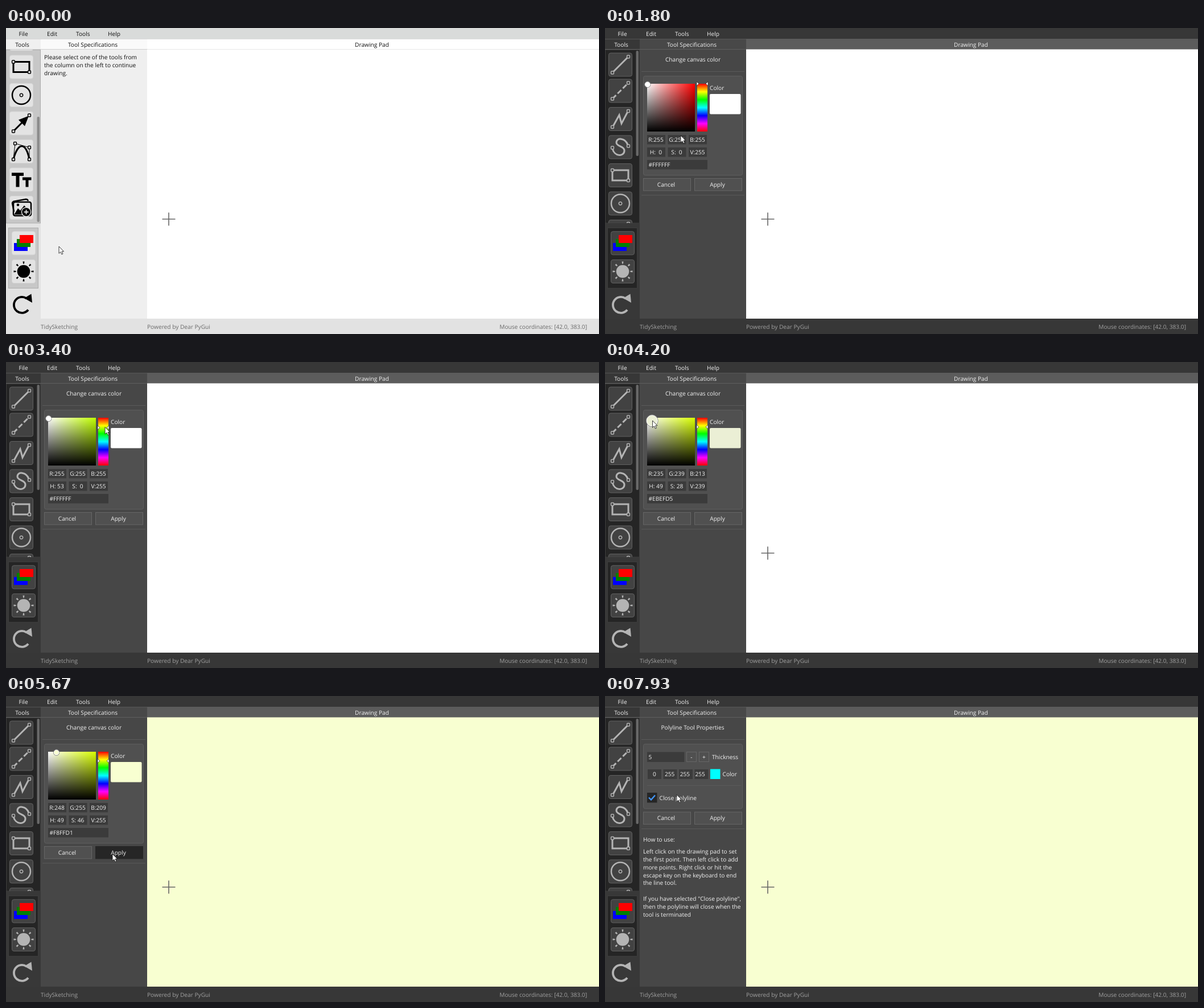
An HTML page for the animation above (8 s loop, 1042 by 538 pixels).

```html
<!DOCTYPE html>
<html lang="en">
<head>
<meta charset="utf-8">
<title>Drawing app</title>
<style>
html, body { margin: 0; width: 100%; height: 100%; overflow: hidden; background: #fff; }
svg {
  display: block; width: 100vw; height: 100vh;
  --menu: #d9dbda; --headA: #f0f0f0; --headB: #fafafa; --headC: #fff; --rule: #cfcfcf;
  --panel: #efefef; --side: #e2e2e2; --tools: #c7c7c7; --edge: #adadad; --foot: #e2e2e2;
  --btn: #e3e3e3; --btnEdge: #d6d6d6; --hover: #f2f2f2; --thumb: #8c8c8c;
  --ink: #000; --text: #111; --dim: #6b6b6b; --tip: #f2f2f2;
}
svg.dark {
  --menu: #373737; --headA: #373737; --headB: #484848; --headC: #5c5c5c; --rule: #5f5f5f;
  --panel: #474747; --side: #383838; --tools: #252525; --edge: #3d3d3d; --foot: #373737;
  --btn: #424242; --btnEdge: #606060; --hover: #252525; --thumb: #686868;
  --ink: #b4b4b4; --text: #f2f2f2; --dim: #a0a0a0; --tip: #252525;
}
text { font: 10.17px "Open Sans", "Noto Sans", sans-serif; fill: var(--text); white-space: pre; text-rendering: geometricPrecision; }
.dim { fill: var(--dim); }
.menu { fill: var(--menu); } .headA { fill: var(--headA); } .headB { fill: var(--headB); }
.headC { fill: var(--headC); } .panel { fill: var(--panel); } .side { fill: var(--side); }
.foot { fill: var(--foot); } .thumb { fill: var(--thumb); } .rule { fill: var(--rule); }
.box { fill: var(--tools); stroke: var(--edge); }
.btn { fill: var(--btn); stroke: var(--btnEdge); }
.btn.hot { fill: var(--hover); }
.group { fill: #505050; stroke: #5e5e5e; }
.push { fill: #505050; stroke: #666; }
.push.hot { fill: #262626; stroke: #262626; }
.field { fill: #3b3b3b; }
.line { fill: #5a5a5a; }
.tip { fill: var(--tip); }
.ink { fill: none; stroke: var(--ink); stroke-width: 3; }
.solid { fill: var(--ink); }
.node { fill: var(--btn); stroke: var(--ink); stroke-width: 1.5; }
.thin { fill: none; stroke: var(--ink); stroke-width: 1; }
</style>
</head>
<body>
<svg id="app" viewBox="0 0 1042 538" preserveAspectRatio="none"></svg>
<script>
const LOOP = 8000, STEP = 200 / 3;

// Markup helpers
const rect = (x, y, w, h, cls, more = "") =>
  `<rect x="${x}" y="${y}" width="${w}" height="${h}" class="${cls}" ${more}/>`;
const text = (x, y, s, anchor = "start", more = "") =>
  `<text x="${x}" y="${y + 3.7}" text-anchor="${anchor}" ${more}>${s}</text>`;
const mid = (x, y, s, more) => text(x, y, s, "middle", more);
const path = (d, cls, more = "") => `<path d="${d}" class="${cls}" ${more}/>`;
const node = (x, y) => rect(x - 2.4, y - 2.4, 4.8, 4.8, "node", 'rx="1"');
const ends = node(-14, 14) + node(14, -14);
const button = (x, y, id) => rect(x - 20.5, y - 20.5, 41, 41, "btn", `rx="3.5" id="${id}"`);
const push = (x, y, label, id) =>
  rect(x + .5, y + .5, 83, 21.5, "push", `id="${id}"`) + mid(x + 40.5, y + 11.2, label);
const paragraph = (x, y, lines) => lines.map((s, i) => text(x, y + i * 13.8, s)).join("");

// Tool icons, drawn around their own centre
const icons = {
  line: path("M-14 14L14-14", "ink") + ends,
  dashed: path("M-14 14L14-14", "ink", 'stroke-dasharray="9 4"') + ends,
  polyline: path("M-13 13L-2-7L2 8L13-13", "ink", 'stroke-width="3.4"') + ends,
  doodle: path("M13-4C9-16-7-18-7-8C-7-1 8-2 7 7C6 17-11 17-14 2", "ink") + node(-14, 1) + node(14, -2),
  rect: path("M-14-9H14V9H-14Z", "ink") + node(-14, -9) + node(14, 9),
  circle: '<circle r="16" class="ink" style="stroke-width:2.5"/><circle r="2.7" class="thin" style="stroke-width:1.5"/>',
  arrow: path("M-14 14L8-8", "ink") + path("M13-13L-5-6L6 5Z", "solid") + ends,
  bezier: path("M-14 14L-11-14L14-7V14", "thin") + path("M-14 14C-6-17 8-17 14 14", "ink") +
    node(-11, -14) + node(14, -7) + node(-14, 14) + node(14, 14),
  letters: path("M-17-12H4V-6.5H-3.5V13H-9.5V-6.5H-17Z", "solid") + path("M2-4H17.5V1H12.5V13H7.5V1H2Z", "solid"),
  picture: path("M-13 7L-16-8Q-16-10-14-11L8-15Q11-15 12-12", "ink", 'style="stroke-width:2.5"') +
    rect(-14, -10, 31, 24, "ink", 'rx="3" style="stroke-width:2.5"') +
    path("M-12 11L-6 1L-2 5L5-4L14 6V12H-12Z", "solid") + '<circle cx="-6" cy="-5" r="2.3" class="solid"/>' +
    '<circle cx="8.5" cy="7.5" r="8.7" style="fill:var(--btn)"/><circle cx="8.5" cy="7.5" r="7.3" class="solid"/>' +
    path("M8.5 3.5V11.5M4.5 7.5H12.5", "", 'style="stroke:var(--btn);stroke-width:1.8"')
};
const tools = Object.entries(icons).map(([name, art], i) => {
  const y = i ? 110.5 + (i - 1) * 49.5 : 64.5;
  return button(27, y, name) + `<g transform="translate(27 ${y})">${art}</g>`;
}).join("");

const rays = [...Array(8)].map((_, i) =>
  path("M-1.5-17.5H1.5L.9-13.5H-.9Z", "solid", `transform="rotate(${i * 45})"`)).join("");

const channels = ["R", "G", "B", "H", "S", "V"].map((c, i) => {
  const x = 74 + (i % 3) * 36.5, y = i < 3 ? 188 : 210;
  return rect(x, y, 32, 16.5, "field") + mid(x + 15.5, y + 8.3, "", `id="ch${c}"`);
}).join("");

const hueStops = [..."0123456"].map(i => `<stop offset="${i / 6}" stop-color="hsl(${i * 60},100%,50%)"/>`).join("");
const pointer = "M0-3.6L4 0L0 3.6Z";

const colorPanel = `<g id="colorPanel">
  ${mid(154.5, 55, "Change canvas color")}${rect(64, 76, 181, 1, "line")}
  ${rect(67.5, 84.5, 174, 174.5, "group", 'rx="3"')}
  ${rect(74, 98, 84, 84, "", 'id="hueFill"')}
  ${rect(74, 98, 84, 84, "", 'fill="url(#white)"')}${rect(74, 98, 84, 84, "", 'fill="url(#black)"')}
  ${rect(162, 98, 18, 84, "", 'fill="url(#hues)"')}
  <g id="marks" fill="#fff" stroke="#222" stroke-width=".7">
    <path d="${pointer}" transform="translate(161 0)"/><path d="${pointer}" transform="translate(181 0) scale(-1 1)"/>
  </g>
  <circle id="ringOut" fill="none" stroke="#808080"/><circle id="ring" stroke="#fff"/>
  ${text(184, 105, "Color")}${rect(184, 116, 54.5, 35.5, "", 'rx="2" id="swatch"')}
  ${channels}${rect(74, 232, 106, 16.5, "field")}${text(76.5, 240.2, "", "start", 'id="hex"')}
  ${push(67, 264, "Cancel", "c1")}${push(157, 264, "Apply", "apply")}${rect(64, 293.5, 181, 1, "line")}
</g>`;

const linePanel = `<g id="linePanel">
  ${mid(154, 55, "Polyline Tool Properties")}${rect(64, 76, 181, 1, "line")}
  ${rect(67.5, 84.5, 174, 113.5, "group", 'rx="3"')}
  ${rect(74, 98.5, 65.5, 17.5, "field")}${text(76.5, 107.5, "5")}
  ${rect(143.5, 98.5, 17, 17, "push")}${mid(152, 107.5, "-")}
  ${rect(165.5, 98.5, 17, 17, "push")}${mid(174, 107.5, "+")}${text(188, 107.5, "Thickness")}
  ${[0, 255, 255, 255].map((v, i) => rect(75 + i * 27.5, 129, 24, 17, "field") + mid(87 + i * 26.7, 137.5, v)).join("")}
  ${rect(185, 128.5, 17.5, 17.5, "", 'fill="#0ff"')}${text(206.5, 137.5, "Color")}
  ${rect(74, 157, 165, 1, "line")}
  ${rect(74, 170, 17.5, 17.5, "field", 'id="check"')}
  <path id="tick" d="M77 178.5L81 182.5L88 174.5" fill="none" stroke="#4296fa" stroke-width="2.4"/>
  ${text(95.5, 179, "Close polyline")}
  ${push(67, 203.5, "Cancel", "c2")}${push(157, 203.5, "Apply", "a2")}${rect(64, 233, 181, 1, "line")}
  ${paragraph(67, 252, ["How to use:"])}
  ${paragraph(67, 273.5, ["Left click on the drawing pad to set", "the first point. Then left click to add",
    "more points. Right click or hit the", "escape key on the keyboard to end", "the line tool.", "",
    'If you have selected "Close polyline",', "then the polyline will close when the", "tool is terminated"])}
</g>`;

const app = document.getElementById("app");
app.innerHTML = `<defs>
  <clipPath id="toolClip"><rect x="0" y="38" width="61" height="305"/></clipPath>
  <linearGradient id="white"><stop stop-color="#fff"/><stop offset="1" stop-color="#fff" stop-opacity="0"/></linearGradient>
  <linearGradient id="black" x2="0" y2="1"><stop stop-opacity="0"/><stop offset="1"/></linearGradient>
  <linearGradient id="hues" x2="0" y2="1">${hueStops}</linearGradient>
</defs>
${rect(0, 0, 1042, 538, "foot")}${rect(0, 0, 1042, 19, "menu")}
${rect(0, 19, 61, 19, "headA")}${rect(61, 19, 187, 19, "headB")}${rect(248, 19, 794, 19, "headC")}
${rect(0, 19, 1042, .7, "rule")}${rect(0, 37, 1042, 1, "rule")}
${rect(0, 38, 61, 473, "side")}${rect(61, 38, 187, 473, "panel")}
${rect(248, 37.5, 794, 473.5, "", 'id="pad"')}
${text(22.5, 10, "File")}${text(72, 10, "Edit")}${text(123, 10, "Tools")}${text(179, 10, "Help")}
${mid(28.5, 29, "Tools")}${mid(152.5, 29, "Tool Specifications")}${mid(643, 29, "Drawing Pad")}
${text(61, 525, "TidySketching", "start", 'class="dim"')}
${text(248, 525, "Powered by Dear PyGui", "start", 'class="dim"')}
${text(1021, 525, "Mouse coordinates: [42.0, 383.0]", "end", 'class="dim"')}
${rect(.5, 38.5, 60, 304.5, "box")}
<g clip-path="url(#toolClip)"><g id="toolList">${tools}</g></g>
${rect(54.5, 40, 4.5, 185, "thumb", 'rx="2" id="thumb"')}
${rect(4.5, 351.5, 52, 106, "box")}
${button(31, 378.3, "palette")}
${rect(14, 378, 24, 14, "", 'fill="#00f"')}${rect(19, 371, 24, 14, "", 'fill="#008000"')}${rect(24, 364, 24, 14, "", 'fill="#f00"')}
${button(31, 428, "sun")}<g transform="translate(31 428)"><circle r="11.3" class="solid"/>${rays}</g>
${path("M39 495.5A14 14 0 1 1 36 475.5", "ink", 'style="stroke-width:3.8"')}${path("M32 475L44.5 467.5L46 483Z", "solid")}
<path d="M274.5 336H297.5M286 324.5V347.5" stroke="#666" stroke-width="1.6" id="cross"/>
<g id="intro">${paragraph(67, 51.3, ["Please select one of the tools from", "the column on the left to continue", "drawing."])}</g>
${colorPanel}${linePanel}
<g id="tip">${rect(0, 0, 107, 25, "tip", 'id="tipBox"')}${text(5.5, 13, "", "start", 'id="tipText"')}</g>
<path id="cursor" d="M0 0V12.3L2.9 9.7L4.9 14L6.9 13.1L5 8.9H8.6Z" fill="#fff" stroke="#111" stroke-width=".8"/>`;

const el = {};
app.querySelectorAll("[id]").forEach(e => el[e.id] = e);
const show = (e, on) => e.style.display = on ? "" : "none";
const set = (e, attrs) => { for (const k in attrs) e.setAttribute(k, attrs[k]); };
const within = (t, a, b) => t >= a && t < b;

// Eased value along [time, value, value...] keys
function follow(keys, t) {
  const i = keys.findIndex(k => k[0] > t);
  if (i < 0) return keys[keys.length - 1].slice(1);
  if (i === 0) return keys[0].slice(1);
  const a = keys[i - 1], b = keys[i], u = (t - a[0]) / (b[0] - a[0]), e = u * u * (3 - 2 * u);
  return a.slice(1).map((v, j) => v + (b[j + 1] - v) * e);
}

const cursorKeys = [
  [0, 93, 384], [330, 36, 430], [1000, 36, 430], [1400, 35, 387], [1600, 35, 387],
  [1800, 133, 189], [2470, 174, 97], [3200, 174, 114.5], [3400, 174, 114.5], [3470, 174, 113],
  [3930, 81, 105], [4000, 81, 105], [4400, 86, 101], [4600, 86, 101], [4670, 88, 97],
  [4930, 126.5, 154], [5330, 187, 277.5], [5670, 187, 277.5], [6200, 22, 164],
  [6870, 22, 164], [7530, 126, 179], [7870, 126, 179], [7930, 126, 173.5]
];
const hsvKeys = [
  [2470, 0, 0, 255], [3200, 53, 0, 255], [3400, 53, 0, 255], [3470, 49, 0, 255],
  [4000, 49, 0, 255], [4070, 49, 22, 235], [4400, 49, 40, 246], [4600, 49, 40, 246], [4670, 49, 46, 255]
];
const tips = [
  [600, 730, 107, "Switch to dark mode"], [730, 1070, 107, "Switch to light mode"],
  [1330, 1670, 108, "Change canvas color"], [6200, 6400, 140, "Click to draw a polyline"]
];

function toRgb(h, s, v) {
  return [5, 3, 1].map(n => {
    const k = (n + h / 255 * 6) % 6;
    return Math.round(v * (1 - s / 255 * Math.max(0, Math.min(k, 4 - k, 1))));
  });
}

function drawPicker(t) {
  const [h, s, v] = follow(hsvKeys, t).map(Math.round);
  const rgb = toRgb(h, s, v), fill = `rgb(${rgb})`;
  [...rgb, h, s, v].forEach((n, i) => {
    const c = "RGBHSV"[i];
    el["ch" + c].textContent = `${c}:${String(n).padStart(3)}`;
  });
  el.hex.textContent = "#" + rgb.map(n => n.toString(16).padStart(2, "0")).join("").toUpperCase();
  set(el.swatch, { fill });
  set(el.hueFill, { fill: `rgb(${toRgb(h, 255, 255)})` });
  set(el.marks, { transform: `translate(0 ${98 + h / 255 * 84})` });
  const dragging = within(t, 4070, 4400) || within(t, 4670, 4730);
  const cx = Math.max(74.8, 73.5 + s / 255 * 84), cy = Math.max(99.3, 182 - v / 255 * 84), r = dragging ? 9.5 : 4.3;
  set(el.ring, { cx, cy, r, fill });
  set(el.ringOut, { cx, cy, r: r + .9 });
}

function draw(time) {
  const t = Math.round(Math.floor((time + 4) / STEP) * STEP / 10) * 10;
  const dark = t >= 730;
  app.setAttribute("class", dark ? "dark" : "");
  set(el.toolList, { transform: `translate(0 ${dark ? 0 : -190.5})` });
  set(el.thumb, { y: dark ? 40 : 156 });
  set(el.pad, { fill: t < 5470 ? "#fff" : "#f8ffd1" });
  show(el.cross, !within(t, 3400, 3470));

  show(el.intro, t < 1670);
  show(el.colorPanel, within(t, 1670, 6730));
  show(el.linePanel, t >= 6730);
  drawPicker(t);

  const hot = (id, a, b) => el[id].classList.toggle("hot", within(t, a, b));
  hot("sun", 600, 1200);
  hot("palette", 1200, 1730);
  hot("apply", 5270, 5800);
  hot("polyline", 6130, 7000);
  el.check.style.fill = t >= 7270 ? "#262626" : "";
  show(el.tick, t >= 7930);

  const [x, y] = follow(cursorKeys, t);
  set(el.cursor, { transform: `translate(${x} ${y})` });
  const tip = tips.find(([a, b]) => within(t, a, b));
  show(el.tip, tip);
  if (tip) {
    set(el.tip, { transform: `translate(${x + 19} ${y + 1})` });
    set(el.tipBox, { width: tip[2] });
    el.tipText.textContent = tip[3];
  }
}

const start = performance.now();
function tick() {
  draw((performance.now() - start) % LOOP);
  requestAnimationFrame(tick);
}
draw(0);
requestAnimationFrame(tick);
</script>
</body>
</html>
```
